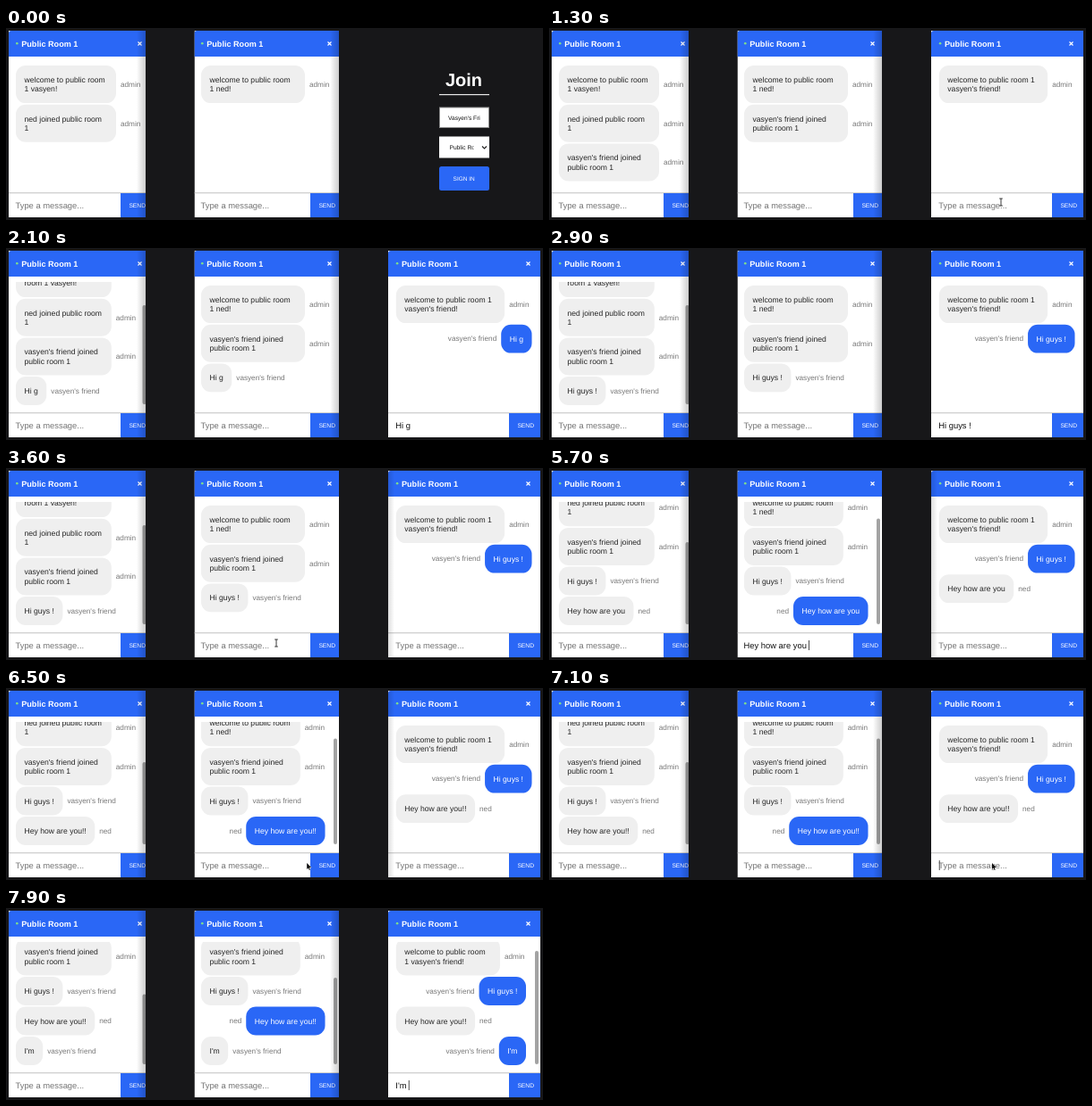
These frames come from a looping animation (600 by 215 pixels, 8 s). An HTML page with a canvas:

```html
<!DOCTYPE html>
<html lang="en">
<head>
<meta charset="utf-8">
<title>Chat rooms</title>
<style>
  html, body { margin: 0; width: 600px; height: 215px; overflow: hidden; background: #171719; }
  canvas { display: block; width: 600px; height: 215px; }
</style>
</head>
<body>
<canvas id="stage"></canvas>
<script>
const canvas = document.getElementById('stage');
const ctx = canvas.getContext('2d');
const dpr = window.devicePixelRatio || 1;
canvas.width = 600 * dpr;
canvas.height = 215 * dpr;
ctx.textRendering = 'geometricPrecision';

const LOOP = 8000, BLUE = '#2a67f6', DARK = '#171719';
const VIEW_TOP = 38, VIEW_END = 176, LIST_TOP = 42;
const PAD = 9.5, LINE = 10.2, GAP = 1.6, SCROLL_W = 6.5;
const JOINED = 600, OPENED = 500;
const HOST = 'vasyen', PEER = 'ned', GUEST = "vasyen's friend";

// Messages are shown live, one character per 100 ms.
const chat = [
  { who: GUEST, at: 1800, sent: 3300, text: 'Hi guys !' },
  { who: PEER, at: 4300, sent: 6200, text: 'Hey how are you!!' },
  { who: GUEST, at: 7500, sent: 9000, text: "I'm" }
];
const notice = (text, at = -1e4) => ({ who: 'admin', at, text });
const welcome = (name, at) => notice(`welcome to public room 1 ${name}!`, at);
const guestJoined = notice(`${GUEST} joined public room 1`, JOINED);

const rooms = [
  { me: HOST, x: 3, end: 156, left: 11, width: 140, send: 128, bar: 152.5,
    list: [welcome(HOST), notice(`${PEER} joined public room 1`), guestJoined, ...chat] },
  { me: PEER, x: 210.5, end: 372, left: 218, width: 145, send: 340, bar: 366,
    list: [welcome(PEER), guestJoined, ...chat] },
  { me: GUEST, x: 427, end: 597, left: 435.8, width: 151.7, send: 562, bar: 591,
    list: [welcome(GUEST, JOINED), ...chat] }
];

// Pointer trips: start, arrival, hidden, from, to.
const trips = [
  { t0: 800, t1: 1100, off: 1800, from: [509, 172], to: [505, 195], beam: true },
  { t0: 3300, t1: 3600, off: 4300, from: [505, 195], to: [302, 196], beam: true },
  { t0: 6300, t1: 7050, off: 7500, from: [302, 196], to: [495, 196], beam: false }
];

const clamp = v => Math.max(0, Math.min(1, v));
const ease = v => 1 - (1 - clamp(v)) ** 3;
const setFont = (size, weight = 400) =>
  ctx.font = `${weight} ${size}px "Liberation Sans", Arial, sans-serif`;

function rect(x, y, w, h, color) {
  ctx.fillStyle = color;
  ctx.fillRect(x, y, w, h);
}

function round(x, y, w, h, r, color) {
  ctx.fillStyle = color;
  ctx.beginPath();
  ctx.roundRect(x, y, w, h, r);
  ctx.fill();
}

function write(text, x, y, size, color, align = 'left', weight = 400) {
  setFont(size, weight);
  ctx.fillStyle = color;
  ctx.textAlign = align;
  ctx.fillText(text, x, y);
}

function clipped(x, y, w, h, draw) {
  ctx.save();
  ctx.beginPath();
  ctx.rect(x, y, w, h);
  ctx.clip();
  draw();
  ctx.restore();
}

function wrap(text, max) {
  const lines = [];
  for (const word of text.split(' ')) {
    const joined = lines.length ? `${lines.at(-1)} ${word}` : word;
    if (lines.length && ctx.measureText(joined).width <= max) lines[lines.length - 1] = joined;
    else lines.push(word);
  }
  return lines;
}

const typed = (m, t) =>
  m.who === 'admin' ? m.text : m.text.slice(0, Math.floor((t - m.at) / 100) + 1);

function layout(room, width, t) {
  setFont(8.6);
  let y = LIST_TOP, rolled = LIST_TOP;
  const items = room.list.filter(m => t >= m.at).map(m => {
    const lines = wrap(typed(m, t).trim(), width * 0.8 - 2 * PAD);
    const w = lines.length > 1 ? width * 0.8 : ctx.measureText(lines[0]).width + 2 * PAD;
    const h = 21.7 + LINE * lines.length;
    const item = { m, lines, w, h, y };
    y += h + GAP;
    rolled += (h + GAP) * ease((t - m.at) / 220);
    return item;
  });
  return { items, bottom: y - GAP, scroll: Math.max(0, rolled - GAP - VIEW_END) };
}

function drawMessages(room, t) {
  let width = room.width;
  let page = layout(room, width, t);
  const scrolls = page.bottom > VIEW_END;
  if (scrolls) page = layout(room, width -= SCROLL_W, t);

  clipped(room.x, VIEW_TOP, room.end - room.x, 140, () => {
    for (const { m, lines, w, h, y } of page.items) {
      const mine = m.who === room.me;
      const x = mine ? room.left + width - w : room.left;
      const top = y - page.scroll;
      const mid = top + h / 2;
      round(x, top, w, h, 11, mine ? BLUE : '#efefef');
      lines.forEach((line, i) =>
        write(line, x + PAD, mid + 3 + (i - (lines.length - 1) / 2) * LINE, 8.6, mine ? '#fff' : '#252525'));
      write(m.who, mine ? x - 5 : x + w + 5, mid + 2.8, 8.2, '#777', mine ? 'right' : 'left');
    }
  });
  if (scrolls) {
    const top = 40 + page.scroll / (page.bottom - VIEW_TOP) * 138;
    round(room.bar, top, 4, 175 - top, 2, '#a3a3a3');
  }
}

function drawInput(room, t) {
  const { x, end, left, send } = room;
  rect(x, 184, end - x, 1.3, '#cfcfcf');
  rect(send, 185, end - send, 27, BLUE);
  write('SEND', send + 18.7, 200.8, 6.7, '#fff', 'center');

  const draft = chat.find(m => m.who === room.me && t >= m.at && t < m.sent);
  const text = draft ? typed(draft, t) : '';
  write(text || 'Type a message...', left - 0.5, 202, 9.4, text ? '#111' : '#757575');
  const focused = room.me === PEER ? t >= 4100 && t < 6200 : room.me === GUEST && t >= 7050;
  if (focused) {
    const offset = text ? ctx.measureText(text).width + 1.8 : 0;
    rect(left + offset, 193, 0.8, 11, '#222');
  }
}

function shade(x, w, from, to) {
  const g = ctx.createLinearGradient(x, 0, x + w, 0);
  g.addColorStop(0, `rgba(0,0,0,${from})`);
  g.addColorStop(1, `rgba(0,0,0,${to})`);
  rect(x, 3, w, 209, g);
}

function drawRoom(room, t) {
  const { x, end, left } = room;
  clipped(x, 3, end - x, 209, () => {
    rect(x, 3, end - x, 209, '#fff');
    round(x, 3, end - x, 29, [3, 0, 0, 0], BLUE);
    round(left, 16, 2.6, 2.6, 1.3, '#7fe08a');
    write('Public Room 1', left + 6.2, 20.5, 9.1, '#fff', 'left', 700);
    const cx = room.send + 21.5;
    ctx.strokeStyle = '#fff';
    ctx.lineWidth = 1.1;
    ctx.beginPath();
    ctx.moveTo(cx - 2, 15.5); ctx.lineTo(cx + 2, 19.5);
    ctx.moveTo(cx + 2, 15.5); ctx.lineTo(cx - 2, 19.5);
    ctx.stroke();
    drawMessages(room, t);
    drawInput(room, t);

    // The window in front casts its shadow on its neighbours.
    const peerInFront = t >= 3500 && t < 7000;
    if (room.me === HOST || (room.me === PEER && !peerInFront)) shade(end - 10, 10, 0, 0.2);
    if (room.me === GUEST && peerInFront) shade(x, 7, 0.13, 0);
  });
}

function drawJoin() {
  write('Join', 511.5, 65, 20, '#fff', 'center', 700);
  rect(484, 74, 56, 1.2, '#e8e8e8');
  rect(484, 88.5, 56, 23.5, '#8c8c8c');
  rect(485, 89.5, 54, 21.5, '#fff');
  clipped(485, 89, 45, 22, () => write("Vasyen's Fri", 494, 102.5, 6.65, '#111'));
  rect(484, 121.5, 56, 24, '#fff');
  clipped(485, 122, 37.5, 23, () => write('Public Room 1', 495.5, 136, 6.65, '#111'));
  ctx.strokeStyle = '#222';
  ctx.lineWidth = 1.2;
  ctx.beginPath();
  ctx.moveTo(532, 132.5);
  ctx.lineTo(534.5, 135);
  ctx.lineTo(537, 132.5);
  ctx.stroke();
  round(484, 155, 56, 27, 2.5, BLUE);
  write('SIGN IN', 511.7, 171, 6.5, '#fff', 'center');
}

function drawPointer(t) {
  const trip = trips.find(p => t >= p.t0 && t < p.off);
  if (!trip) return;
  const k = clamp((t - trip.t0) / (trip.t1 - trip.t0));
  const s = k * k * (3 - 2 * k);
  const [x, y] = trip.from.map((v, i) => v + (trip.to[i] - v) * s);
  ctx.beginPath();
  if (trip.beam && k > 0.9) {
    ctx.strokeStyle = '#222';
    ctx.lineWidth = 0.9;
    ctx.moveTo(x - 1.8, y - 4); ctx.lineTo(x + 1.8, y - 4);
    ctx.moveTo(x, y - 4); ctx.lineTo(x, y + 4);
    ctx.moveTo(x - 1.8, y + 4); ctx.lineTo(x + 1.8, y + 4);
    ctx.stroke();
    return;
  }
  ctx.moveTo(x, y);
  for (const [dx, dy] of [[0, 7], [1.6, 5.6], [2.7, 8], [3.7, 7.5], [2.7, 5.2], [4.9, 5]]) ctx.lineTo(x + dx, y + dy);
  ctx.closePath();
  ctx.strokeStyle = '#fff';
  ctx.lineWidth = 1;
  ctx.stroke();
  ctx.fillStyle = '#111';
  ctx.fill();
}

function frame(now) {
  const t = now % LOOP;
  ctx.setTransform(dpr, 0, 0, dpr, 0, 0);
  rect(0, 0, 600, 215, DARK);
  drawRoom(rooms[0], t);
  drawRoom(rooms[1], t);
  if (t < OPENED) drawJoin();
  else drawRoom(rooms[2], t);
  drawPointer(t);
  requestAnimationFrame(frame);
}
requestAnimationFrame(frame);
</script>
</body>
</html>
```
